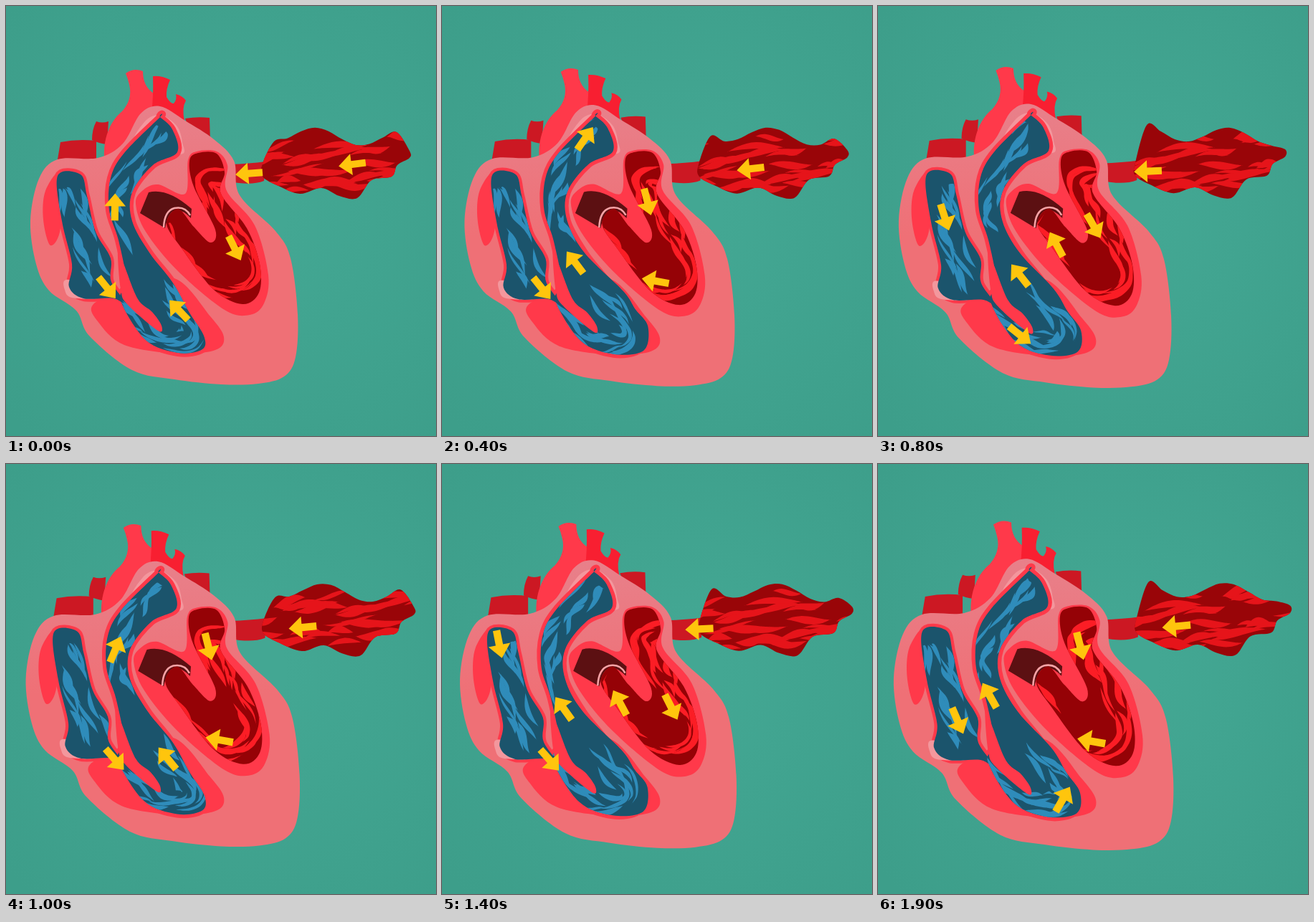
Animation of 600x600 px, one loop 2000 ms. Source, as an HTML page with a canvas:

```html
<!DOCTYPE html>
<html lang="en">
<head>
<meta charset="utf-8">
<title>Blood flow through the heart</title>
<style>
html, body { margin: 0; width: 100%; height: 100%; overflow: hidden; background: #40a490; }
canvas { display: block; width: 100vmin; height: 100vmin; }
</style>
</head>
<body>
<canvas id="stage" width="600" height="600"></canvas>
<script>
const ctx = document.getElementById('stage').getContext('2d');
const RED = '#ff394a', VESSEL = '#cc1823', PALE = '#f3979d', ARROW = '#ffc50d';
const BLUE = ['#1b546c', '#2f8cba'], BLOOD = ['#950206', '#fb1d25'], POOL = ['#990508', '#e6141a'];
const CYCLE = 32, TAU = 2 * Math.PI;

const parse = text => text.trim().split(/\s+/).map(p => p.split(',').map(Number));
const lerp = (a, b, u) => a + (b - a) * u;

// Catmull-Rom curve as SVG path data; a repeated point makes a tighter corner.
function spline(points, closed) {
  const n = points.length;
  const at = i => closed ? points[(i + n) % n] : points[Math.max(0, Math.min(n - 1, i))];
  let d = `M${points[0]}`;
  for (let i = 0; i < (closed ? n : n - 1); i++) {
    const [p, a, b, q] = [at(i - 1), at(i), at(i + 1), at(i + 2)];
    const c1 = a.map((v, k) => v + (b[k] - p[k]) / 6);
    const c2 = b.map((v, k) => v - (q[k] - a[k]) / 6);
    d += `C${c1} ${c2} ${b}`;
  }
  return closed ? d + 'Z' : d;
}
const shape = points => new Path2D(spline(points, true));
const curve = text => shape(parse(text));

function fill(path, color) {
  ctx.fillStyle = color;
  ctx.fill(path);
}
function outline(path, color, width) {
  ctx.strokeStyle = color;
  ctx.lineWidth = width;
  ctx.stroke(path);
}

// Heart
const vessels = [
  ['M76 190Q100 185 126 188L126 220L71 220Z', VESSEL],
  ['M126 161Q134 164 143 161L141 193Q130 192 120 187Q120 172 126 161Z', VESSEL],
  ['M250 157Q267 154 284 156L285 190L262 190Z', VESSEL],
  ['M312 221Q340 220 362 217L360 244Q342 251 312 245Z', VESSEL],
  ['M137 210C136 180 148 158 162 147Q177 130 172 110Q170 101 167 94Q178 86 191 91Q191 112 206 122L232 136L250 170L180 212Z', RED],
  ['M205 98Q217 97 229 103Q223 116 224 127Q230 137 234 136Q239 130 237 123Q246 125 251 132Q245 142 249 160L203 150Q206 125 205 98Z', '#f81f31'],
].map(([d, color]) => [new Path2D(d), color]);

const wall = curve(`72,214 46,241 34,300 42,360 60,397 98,425 117,461 176,508 235,521 300,528 352,527
  388,517 404,490 407,430 397,352 376,314 326,264 318,216 290,186 250,160 215,140 188,150 163,192 128,212`);
const wallTone = ctx.createLinearGradient(0, 140, 0, 320);
wallTone.addColorStop(0, '#e8808a');
wallTone.addColorStop(1, '#ef7076');

const sideVein = curve('76,234 55,258 52,298 62,334 76,310');
const pulmonaryValve = curve('215,152 238,167 246,190 243,207 180,195 193,162');
const atriumValve = curve('84,382 82,396 92,407 132,407 120,390');
const rightLobe = curve('122,416 128,440 165,473 240,485 292,480 304,462 285,433 235,380 170,395');
const leftLobe = curve(`181,276 190,258 212,249 250,262 254,215 266,203 294,203 309,222 308,258 347,306
  366,375 360,415 340,431 305,424 240,370 195,315`);
const outlet = new Path2D('M187 289L199 260Q225 253 259 283L258 296Q230 268 222 310Z');
const outletRim = new Path2D('M220 309Q221 286 235 282Q250 279 257 292');
const valveFlap = curve('156,340 165,362 184,409 204,427 217,446 212,453 170,417 160,395');

const rightAtrium = curve(`72,237 104,235 113,265 125,315 146,352 147,385 172,420 150,408 108,408
  88,392 92,360 78,300`);
const leftHeart = curve(`256,216 268,205 294,206 305,232 300,262 336,310 354,360 353,400 330,416 290,396
  245,338 224,304 240,283 262,308 285,330 292,312 262,252`);

function rightVentricle(swell) {
  const edge = [[232, 385, 22, 12], [256, 428, 15, -6], [276, 460, 12, -15], [274, 479, 8, 0]];
  return shape([
    ...parse('215,155 215,155 232,172 239,204 205,222 176,260 176,300 200,344'),
    ...edge.map(([x, y, dx, dy]) => [x + dx * swell, y + dy * swell]),
    ...parse('240,484 195,466 160,411 168,385 157,327 144,285 146,240 165,205')]);
}
const ventricleAtRest = rightVentricle(0);

// The top edge of the pool is a wave that travels towards the heart.
function pool(phase) {
  const top = [];
  for (let x = 374; x <= 545; x += 19) {
    const wave = Math.cos(TAU * ((x - 433) / 120 + phase / 16));
    top.push([x, lerp(178, 186, (x - 374) / 171) - 11 * wave]);
  }
  return shape([[358, 220], ...top,
    ...parse('563,202 563,212 546,222 538,238 510,243 490,268 465,265 440,254 410,262 380,251 358,238')]);
}

// Curve sampled by length, so that u from 0 to 1 runs at constant speed.
function route(text) {
  const path = document.createElementNS('http://www.w3.org/2000/svg', 'path');
  path.setAttribute('d', spline(parse(text), false));
  const span = path.getTotalLength(), count = 300;
  const samples = Array.from({ length: count + 1 }, (_, i) => path.getPointAtLength(span * i / count));
  const at = u => {
    const f = Math.max(0, Math.min(0.99999, u)) * count, i = Math.floor(f);
    return [lerp(samples[i].x, samples[i + 1].x, f - i), lerp(samples[i].y, samples[i + 1].y, f - i)];
  };
  const heading = (u, reach) => {
    const [ax, ay] = at(u - reach), [bx, by] = at(u + reach);
    return Math.atan2(by - ay, bx - ax);
  };
  return { at, heading, span };
}

const blueRoute = route(`87,253 97,295 125,368 153,407 205,460 239,468 260,460 255,440 226,407
  162,322 152,280 156,260 177,221 213,168`);
const redRoute = route(`483,221 408,230 336,234 284,242 284,260 294,294 321,342 329,374 298,383 268,362 233,300`);
const poolRoute = route('578,204 480,216 420,222 350,234');

// Streaks
function seeded(seed) {
  return () => {
    seed = (seed * 16807) % 2147483647;
    return seed / 2147483647;
  };
}
const random = seeded(48271);
const between = (a, b) => lerp(a, b, random());

// Streaks run over the part of a route between two fractions, within a band beside it.
function stream(path, from, to, near, far, count, size = 1) {
  const streaks = Array.from({ length: count }, (_, i) => ({
    start: (i + random()) / count,
    side: between(near, far),
    length: between(24, 58) * size / path.span,
    half: between(1.8, 4.6) * size,
    bend: between(0, TAU),
  }));
  return { path, from, to, streaks };
}

function drawStream({ path, from, to, streaks }, step) {
  const travelled = step * 20 / (path.span * (to - from));
  for (const s of streaks) {
    const centre = lerp(from, to, (s.start + travelled) % 1);
    const left = [], right = [];
    for (let j = 0; j <= 6; j++) {
      const u = centre + (j / 6 - 0.5) * s.length;
      const [x, y] = path.at(u), angle = path.heading(u, 0.03);
      const mid = s.side + 4 * Math.sin(j * 0.6 + s.bend);
      const half = s.half * Math.sin(Math.PI * j / 6);
      const offset = d => [x - Math.sin(angle) * d, y + Math.cos(angle) * d];
      left.push(offset(mid + half));
      right.unshift(offset(mid - half));
    }
    ctx.fill(shape([...left, ...right]));
  }
}

const atriumStreams = [stream(blueRoute, 0, 0.2, -17, 20, 15)];
const ventricleStreams = [
  stream(blueRoute, 0.27, 0.58, -14, 14, 24),
  stream(blueRoute, 0.73, 1, -16, 16, 15)];
const leftStreams = [
  stream(redRoute, 0.38, 0.52, -16, 14, 9),
  stream(redRoute, 0.52, 1, -27, -3, 24)];
const poolStreams = [stream(poolRoute, 0, 1, -36, 38, 32, 1.4)];

function fluid(path, [dark, bright], streams, step) {
  ctx.save();
  fill(path, dark);
  ctx.clip(path);
  ctx.fillStyle = bright;
  streams.forEach(s => drawStream(s, step));
  ctx.restore();
}

// Arrows
const arrow = new Path2D('M19 0L1 -15L1 -5L-19 -5L-19 5L1 5L1 15Z');

function drawArrows(path, lap, starts, step) {
  for (const start of starts) {
    const u = (start + step) % lap / lap;
    ctx.save();
    ctx.translate(...path.at(u));
    ctx.rotate(path.heading(u, 0.6 / lap));
    fill(arrow, ARROW);
    ctx.restore();
  }
}

const backdrop = ctx.createRadialGradient(330, 290, 60, 330, 290, 430);
backdrop.addColorStop(0, '#43a793');
backdrop.addColorStop(1, '#3d9e8a');

function drawHeart() {
  vessels.forEach(([path, color]) => fill(path, color));
  fill(wall, wallTone);
  fill(sideVein, RED);
  fill(pulmonaryValve, PALE);
  outline(rightAtrium, RED, 8);
  fill(atriumValve, PALE);
  fill(rightLobe, RED);
  outline(ventricleAtRest, RED, 10);
  fill(leftLobe, RED);
  fill(outlet, '#5c1012');
}

function draw(tick) {
  const step = Math.min(58, Math.round(tick * 3.125)), phase = step % CYCLE;
  const zoom = 1 + tick * 0.0024;

  ctx.setTransform(1, 0, 0, 1, 0, 0);
  ctx.fillStyle = backdrop;
  ctx.fillRect(0, 0, 600, 600);
  ctx.setTransform(zoom, 0, 0, zoom, 300 * (1 - zoom), 300 * (1 - zoom));

  drawHeart();
  fluid(rightAtrium, BLUE, atriumStreams, phase);
  fluid(rightVentricle(Math.sin(Math.PI * phase / CYCLE)), BLUE, ventricleStreams, phase);
  fill(valveFlap, RED);
  fluid(leftHeart, BLOOD, leftStreams, phase);
  outline(outletRim, '#f6a3a6', 2.5);
  fluid(pool(phase), POOL, poolStreams, phase);
  drawArrows(blueRoute, 30, [7, 16, 24], step);
  drawArrows(redRoute, 27, [0, 8, 17], step);
}

const began = performance.now();
let shown = -1;
function loop() {
  const tick = Math.floor((performance.now() - began) % 2000 / 100);
  if (tick !== shown) draw(shown = tick);
  requestAnimationFrame(loop);
}
loop();
</script>
</body>
</html>
```
